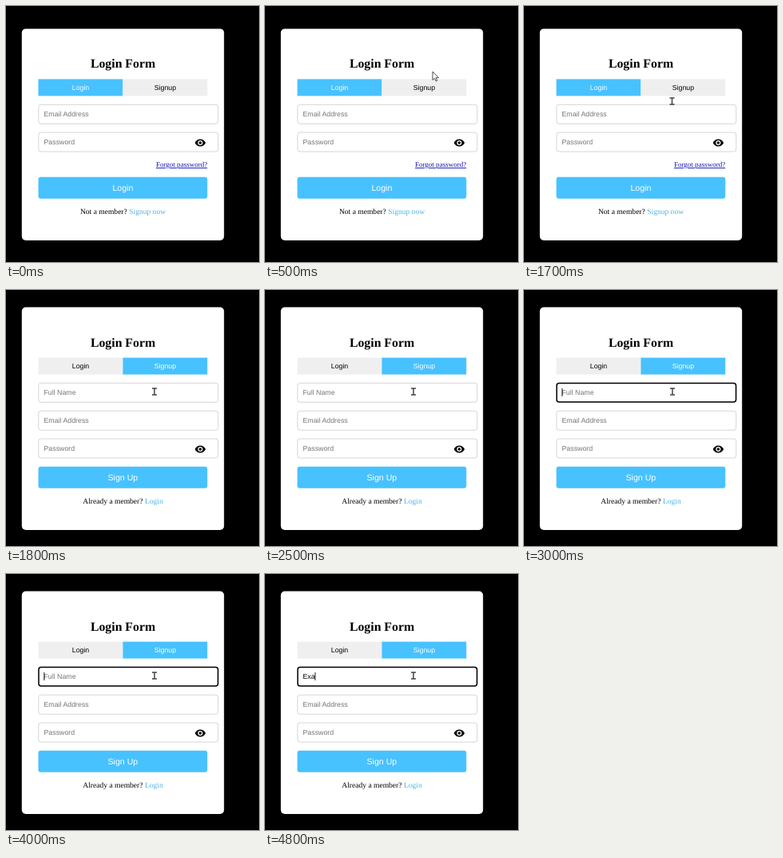
Recreate the animation shown at these times as an HTML page. Size 317 by 320 pixels, loop 5 s.

```html
<!DOCTYPE html>
<html lang="en">
<head>
<meta charset="utf-8">
<title>Login Form</title>
<style>
  html, body { margin: 0; width: 100%; height: 100%; overflow: hidden; background: #000; }
  svg { display: block; width: 317px; height: 320px; text-rendering: geometricPrecision; }
  .sans { font-family: "Liberation Sans", Arial, sans-serif; }
  .serif { font-family: "Liberation Serif", "Times New Roman", serif; }
  .mid { text-anchor: middle; }
</style>
</head>
<body>
<svg id="stage" viewBox="0 0 317 320"></svg>
<script>
const BLUE = '#48c1ff', LINK = '#4db5e6', LOOP = 5000;
const stage = document.getElementById('stage');

const rect = (x, y, w, h, fill, extra = '') =>
  `<rect x="${x}" y="${y}" width="${w}" height="${h}" fill="${fill}" ${extra}/>`;
const text = (x, y, size, str, fill = '#000', cls = 'sans', extra = '') =>
  `<text x="${x}" y="${y}" font-size="${size}" fill="${fill}" class="${cls}" ${extra}>${str}</text>`;

const field = (y, label) =>
  rect(40.8, y, 225, 24, '#fff', 'rx="3" stroke="#ccc" stroke-width=".8"') +
  text(47.5, y + 14.9, 8.8, label, '#757575');

const eye = y => `<path transform="translate(236.1 ${y}) scale(.61)" fill-rule="evenodd"
  d="M12 4.5C7 4.5 2.7 7.6 1 12c1.7 4.4 6 7.5 11 7.5s9.3-3.1 11-7.5c-1.7-4.4-6-7.5-11-7.5z
     M12 17a5 5 0 1 1 0-10 5 5 0 0 1 0 10z M12 9a3 3 0 1 0 0 6 3 3 0 0 0 0-6z"/>`;

const button = (y, label) =>
  rect(40.5, y, 211.8, 27, BLUE, 'rx="3"') + text(146.4, y + 17.2, 10.6, label, '#fff', 'sans mid');

const footer = (y, question, link) =>
  text(146.5, y, 9.55, `${question} <tspan fill="${LINK}">${link}</tspan>`, '#000', 'serif mid');

function frame(top, height, signup) {
  const tab = (x, label, active) =>
    rect(x, top + 63, 105.9, 21, active ? BLUE : '#efefef') +
    text(x + 53, top + 76.4, 8.75, label, active ? '#fff' : '#000', 'sans mid');
  return rect(19.8, top, 253.4, height, '#fff', 'rx="5"') +
    text(146.5, top + 48.9, 15.8, 'Login Form', '#000', 'serif mid', 'font-weight="bold"') +
    tab(40.5, 'Login', !signup) + tab(146.4, 'Signup', signup);
}

const loginForm = frame(28.4, 264.6, false) +
  field(123.3, 'Email Address') + field(158, 'Password') + eye(163.7) +
  text(252.2, 201, 9.03, 'Forgot password?', '#1414b4', 'serif',
    'text-anchor="end" text-decoration="underline"') +
  button(213.8, 'Login') + footer(260, 'Not a member?', 'Signup now');

const signupForm = frame(21.6, 278.3, true) +
  field(116.3, 'Full Name') + field(151.2, 'Email Address') + field(186, 'Password') + eye(191.7) +
  button(220.8, 'Sign Up') + footer(267, 'Already a member?', 'Login');

const pointers = {
  arrow: '<path d="M0 0V10.5L2.5 8.3 4.2 12 5.8 11.3 4.2 7.7H7.5z" fill="#fff" stroke="#222" stroke-width=".8"/>',
  hand: `<path d="M2.2 7.4V1.3a1 1 0 0 1 2 0V5l3.5.7q1.4.4 1.3 1.8L8.6 10 8 12.4H4L1 8.9Q.3 7.6 1.3 7.2z"
    fill="#fff" stroke="#222" stroke-width=".9"/><path d="M5.7 5.5v2M7.3 6v1.7" stroke="#222" stroke-width=".5"/>`,
  beam: '<path d="M-3-4H3M0-4V4M-3 4H3" fill="none" stroke="#444" stroke-width="1.5"/>'
};

// start time, pointer, x, y
const moves = [
  [400, 'arrow', 214, 59], [500, 'arrow', 210, 82], [600, 'hand', 204.5, 100.3],
  [800, 'hand', 202.3, 100.3], [1500, 'hand', 198, 102], [1600, 'hand', 188, 107],
  [1700, 'beam', 185.5, 119], [1800, 'beam', 186, 127]
];

// start time, typed text, caret x
const typing = [[2800, '', 47.8], [4300, 'E', 53.8], [4700, 'Ex', 58.2], [4800, 'Exa', 62.9]];

const latest = (list, t) => list.filter(item => item[0] <= t).pop();

function focusedField(t) {
  const entry = latest(typing, t);
  let out = rect(41, 116.5, 224.6, 23.6, '#fff', 'rx="3" stroke="#000" stroke-width="1.5"');
  out += entry && entry[1]
    ? text(47.5, 131.2, 8.8, entry[1])
    : text(47.5, 131.2, 8.8, 'Full Name', '#757575');
  if (entry && Math.floor((t - entry[0]) / 500) % 2 === 0)
    out += rect(entry[2] - .4, 123, .9, 10, '#000');
  return out;
}

function scene(t) {
  let out = t < 1800 ? loginForm : signupForm;
  if (t >= 2700) out += focusedField(t);
  const move = latest(moves, t);
  if (move) out += `<g transform="translate(${move[2]} ${move[3]})">${pointers[move[1]]}</g>`;
  return out;
}

let shown = '';
function tick() {
  const next = scene(performance.now() % LOOP);
  if (next !== shown) stage.innerHTML = shown = next;
  requestAnimationFrame(tick);
}
tick();
</script>
</body>
</html>
```
